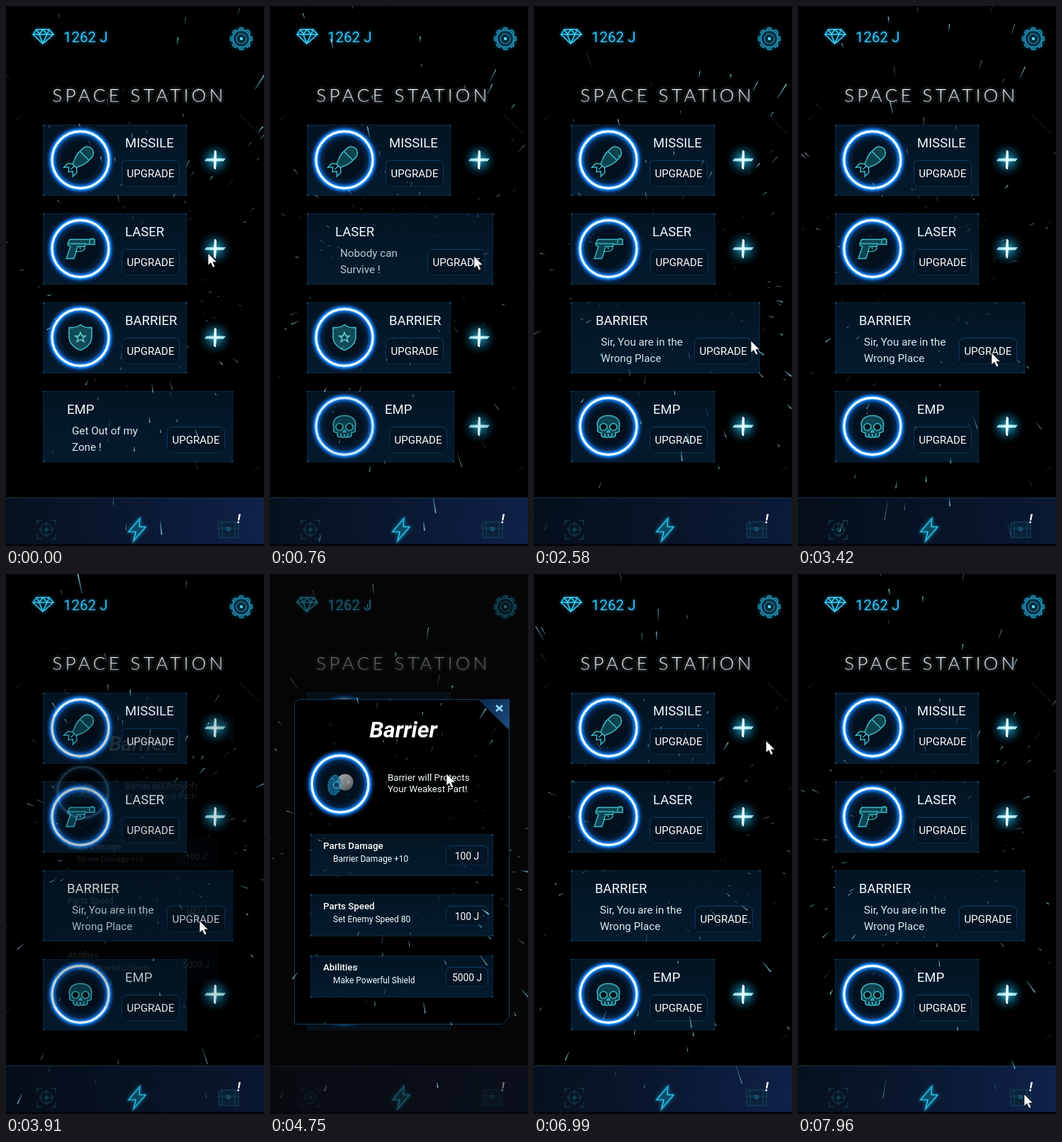
These frames come from a looping animation (364 by 760 pixels, 8 s). An HTML page with a canvas:

```html
<!DOCTYPE html>
<html lang="en">
<head>
<meta charset="utf-8">
<title>Space Station</title>
<style>
html, body { margin: 0; width: 100%; height: 100%; overflow: hidden; background: #000; }
canvas { display: block; width: 100vw; height: 100vh; }
</style>
</head>
<body>
<canvas id="stage" width="364" height="760"></canvas>
<script>
const ctx = document.getElementById('stage').getContext('2d');
const LOOP = 8000, STEP = 70, TAU = Math.PI * 2;
const clamp = v => Math.max(0, Math.min(1, v));
const smooth = v => { v = clamp(v); return v * v * (3 - 2 * v); };
const mix = (a, b, k) => a + (b - a) * k;
const random = n => { const v = Math.sin(n * 12.9898 + 4.1) * 43758.5453; return v - Math.floor(v); };

const CARDS = [
  { title: 'MISSILE', icon: missile },
  { title: 'LASER', icon: pistol, note: ['Nobody can', 'Survive !'], open: 400, close: 2050 },
  { title: 'BARRIER', icon: shield, note: ['Sir, You are in the', 'Wrong Place'], open: 2050, close: Infinity },
  { title: 'EMP', icon: skull, note: ['Get Out of my', 'Zone !'], open: -5000, close: 400 }
];
const OFFERS = [
  [366, 'Parts Damage', 'Barrier Damage +10', '100 J'],
  [451, 'Parts Speed', 'Set Enemy Speed 80', '100 J'],
  [537, 'Abilities', 'Make Powerful Shield', '5000 J']
];
const POPUP_OPEN = 3800, POPUP_CLOSE = 6500;
// time, x, y of the pointer tip
const POINTER = [
  [0, 285, 348], [600, 287, 346], [1350, 303, 472], [2580, 306, 471], [3250, 273, 488],
  [3950, 273, 488], [4650, 249, 281], [5400, 250, 282], [6000, 332, 184], [6750, 328, 188],
  [7750, 319, 732], [8000, 319, 732]
];

// ---- helpers ----
function group(draw, x = 0, y = 0, alpha = 1) {
  ctx.save();
  ctx.translate(x, y);
  ctx.globalAlpha *= alpha;
  draw();
  ctx.restore();
}
function text(str, x, y, font, color = '#f2fbff', align = 'left') {
  ctx.font = font + ' Roboto, sans-serif';
  ctx.textAlign = align;
  ctx.fillStyle = color;
  ctx.fillText(str, x, y);
}
function shape(d, stroke, fill, width = 1) {
  const path = new Path2D(d);
  if (fill) { ctx.fillStyle = fill; ctx.fill(path); }
  if (stroke) { ctx.strokeStyle = stroke; ctx.lineWidth = width; ctx.stroke(path); }
}
function circle(x, y, r, stroke, fill, width = 1) {
  ctx.beginPath();
  ctx.arc(x, y, r, 0, TAU);
  if (fill) { ctx.fillStyle = fill; ctx.fill(); }
  if (stroke) { ctx.strokeStyle = stroke; ctx.lineWidth = width; ctx.stroke(); }
}
function gradient(x0, y0, x1, y1, ...colors) {
  const g = ctx.createLinearGradient(x0, y0, x1, y1);
  colors.forEach((c, i) => g.addColorStop(i / (colors.length - 1), c));
  return g;
}
// radial glow around the current origin; stops are [radius, color]
function halo(...stops) {
  const r = stops[stops.length - 1][0];
  const g = ctx.createRadialGradient(0, 0, 0, 0, 0, r);
  stops.forEach(([at, color]) => g.addColorStop(at / r, color));
  circle(0, 0, r, null, g);
}
function glow(color, blur) { ctx.shadowColor = color; ctx.shadowBlur = blur; }

function panel(x, y, w, h) {
  ctx.fillStyle = gradient(x, y, x, y + h, '#031422', '#03182a', '#041a2d');
  ctx.fillRect(x, y, w, h);
  ctx.strokeStyle = '#08263d';
  ctx.lineWidth = 1;
  ctx.strokeRect(x + .5, y + .5, w - 1, h - 1);
  ctx.fillStyle = '#175275';
  for (const cx of [x, x + w - 2]) for (const cy of [y, y + h - 2]) ctx.fillRect(cx, cy, 2, 2);
}
function button(x, y, w, h, label, font) {
  ctx.beginPath();
  ctx.roundRect(x + .5, y + .5, w - 1, h - 1, 7);
  ctx.fillStyle = '#031424';
  ctx.fill();
  ctx.strokeStyle = gradient(x, y, x, y + h, '#0c3f6b', '#0a2c4c');
  ctx.lineWidth = 1;
  ctx.stroke();
  text(label, x + w / 2, y + h / 2 + 5.5, font, '#fff', 'center');
}
function ring(x, y) {
  group(() => {
    halo([0, '#02101c'], [26, '#02111f'], [33, '#04254a'], [37, '#0a5bc0'], [40, '#1590ff'],
      [43, '#0d72e0'], [45, 'rgba(6,62,135,.75)'], [50, 'rgba(2,30,70,0)']);
    glow('#1a9aff', 5);
    circle(0, 0, 40, '#e6f7ff', null, 3.4);
  }, x, y);
}
function plus(x, y) {
  group(() => {
    halo([0, 'rgba(50,190,220,.85)'], [9, 'rgba(22,125,158,.65)'], [17, 'rgba(8,68,94,.4)'], [25, 'rgba(0,35,55,0)']);
    shape('M-15 1L-12-2H-2L-1-14L2-12V-2H15L12 2H2L1 14L-2 12V2H-13Z', null,
      gradient(-14, 0, 14, 0, '#7fd7e8', '#eaffff', '#8be0f0'));
  }, x, y);
}

// ---- card icons, centred on their ring ----
const LINE = '#3cb9c6', TINT = '#0c4450';
function missile() {
  ctx.rotate(Math.PI / 4);
  shape('M-9-12C-9-26 9-26 9-12V-5C9 3 4 7 4 12H-4C-4 7-9 3-9-5Z', LINE, TINT, 1.5);
  shape('M-9-8H9M-4 12L-9 16V24L-4 19L0 24L4 19L9 24V16L4 12M0 12V19', LINE, null, 1.5);
}
function pistol() {
  shape('M-15-13H15V-14H18V-13H20V-6H8L5-3H-4L-9 14H-20L-14-3Q-18-4-18-7Z', LINE, TINT, 1.5);
  shape('M-17-7H8M6-4Q8 5-6 4M-1-3L0 1M13-12V-7', LINE, null, 1.4);
}
function shield() {
  shape('M0-18Q6-13 16-14V0Q15 12 0 18Q-15 12-16 0V-14Q-6-13 0-18Z', LINE, '#114b56', 1.6);
  shape('M0-7L2-2L7-2L3 1L5 6L0 3L-5 6L-3 1L-7-2L-2-2Z', '#6bdbe5', '#0b3a46', 1.4);
}
function skull() {
  shape('M-10 9Q-17 9-15 3C-18-9-11-15 0-15S18-9 15 3Q17 9 10 9V13Q8 17 5 14Q2 18 0 14Q-2 18-5 14Q-8 17-10 13Z', LINE, TINT, 1.6);
  circle(-7, 1, 5, LINE, '#03141d', 1.6);
  circle(7, 1, 5, LINE, '#03141d', 1.6);
  shape('M0 5L-2 8H2ZM-5 10V14M0 11V14M5 10V14', LINE, null, 1.3);
}

// ---- screen parts ----
function header() {
  group(() => {
    glow('#0a7fae', 4);
    shape('M38 40L43 33H61L67 40L52 53ZM38 40H67M43 33L47 40L52 53L58 40L61 33M47 40L52 33L58 40', '#3bcdf2', null, 1.6);
    text('1262 J', 81, 51, '20.5px', '#35bfee');
  });
  group(() => {
    glow('#0a7fae', 5);
    circle(0, 0, 12, '#2aa6cf', '#02131d', 1.6);
    circle(0, 0, 7, '#2390b5', null, 1.2);
    circle(0, 0, 2.2, null, '#5fd6f5');
    for (let i = 0; i < 8; i++) {
      ctx.rotate(TAU / 8);
      shape('M-3-13L-2-15H2L3-13', '#2aa6cf', null, 1.4);
    }
  }, 332, 46);
  group(() => {
    glow('#8fa9b5', 5);
    ctx.letterSpacing = '4.4px';
    ctx.font = '300 26px Lato, sans-serif';
    ctx.textAlign = 'center';
    ctx.fillStyle = gradient(0, 116, 0, 136, '#ffffff', '#dfe7eb', '#a4b0b6');
    ctx.fillText('SPACE STATION', 188, 135);
  });
  shape('M330 153L357 180M14 161L24 152M348 657L358 648', '#1b1f22');
}
function openness(card, t) {
  if (card.open === undefined || t < card.open) return 0;
  const tail = since => Math.exp(-(t - since) / 115);
  return t < card.close ? 1 - tail(card.open) : tail(card.close);
}
function drawCard(card, i, t) {
  const y = 167 + 125 * i, k = openness(card, t);
  const closed = clamp(1 - 2 * k), opened = clamp(2 * k - 1);
  panel(52, y, Math.round(mix(203, 268, k)), 100);
  if (closed) group(() => {
    ring(105, y + 49.5);
    group(card.icon, 105, y + 49.5);
    plus(295, y + 49.5);
  }, 0, 0, closed);
  text(card.title, Math.round(mix(168, 86, k)), y + 31.5, '18.5px');
  if (opened) group(() => card.note.forEach((line, n) =>
    text(line, mix(175, 93, k), y + 61 + 22.5 * n, '15.2px', '#dce9ef')), 0, 0, opened);
  button(Math.round(mix(163, 227, k)), y + 50, 82, 37, 'UPGRADE', '15px');
}
function navigation(t) {
  const light = .5 + .5 * Math.cos(t / 7600 * TAU);
  ctx.fillStyle = gradient(0, 692, 364, 720, '#050e1a', '#071326', '#0a1833');
  ctx.fillRect(0, 692, 364, 66);
  group(() => {
    ctx.fillStyle = gradient(0, 692, 364, 720, '#06111f', '#0a1832', '#10224a');
    ctx.fillRect(0, 692, 364, 66);
  }, 0, 0, light);
  ctx.fillStyle = '#123a55';
  ctx.fillRect(0, 692, 364, 1);
  ctx.fillStyle = '#05030d';
  ctx.fillRect(0, 757, 364, 3);

  group(() => {
    const dim = '#103847';
    shape('M-13-7V-13H-7M7-13H13V-7M13 7V13H7M-7 13H-13V7M0-11V-5M0 5V11M-11 0H-5M5 0H11', dim, null, 1.5);
    circle(0, 0, 8, dim, null, 1.5);
    circle(0, 0, 3, dim, dim);
  }, 57, 737);
  group(() => {
    glow('#0a80a8', 5);
    shape('M4-16L-12 3H-2L-5 16L12-4H3Z', '#2bb8dc', '#0b4257', 1.7);
  }, 185, 737);
  group(() => {
    shape('M-14 11V-7Q-13-11-9-11H9Q13-11 14-7V11ZM-14-2H14M-9-11V11M9-11V11', '#123e55', '#0a2138', 1.4);
    ctx.fillStyle = '#174d64';
    ctx.fillRect(-3, -4, 6, 6);
  }, 314, 737);
  text('!', 326, 728, 'italic bold 18px', '#fff');
}
function popup(p) {
  ctx.fillStyle = `rgba(10,10,10,${.58 * p})`;
  ctx.fillRect(0, 0, 364, 760);
  ctx.save();
  ctx.globalAlpha = p;
  const s = mix(.88, 1, p);
  ctx.translate(186, 404);
  ctx.scale(s, s);
  ctx.translate(-186, -404);

  shape('M40.5 176.5H337.5V624L328 633.5H34.5V182Z', '#123b60', '#000');
  shape('M293 176H338V220Z', null, gradient(300, 180, 338, 215, '#0c2c52', '#1c4c7c'));
  shape('M319 185L328 193M328 185L319 193', '#93dcf8', null, 2.6);
  text('Barrier', 188, 230, 'italic bold 32px', '#fff', 'center');

  ring(99, 295.5);
  circle(106, 293, 11.5, null, gradient(98, 283, 114, 304, '#a2a7aa', '#55595d'));
  circle(110, 292, 4, '#73787b', '#8b9093');
  ctx.beginPath();
  ctx.ellipse(91, 297, 9, 14, .15, 0, TAU);
  ctx.fillStyle = 'rgba(20,110,160,.75)';
  ctx.fill();
  ctx.strokeStyle = '#3fb5df';
  ctx.setLineDash([2, 1.5]);
  ctx.stroke();
  ctx.setLineDash([]);
  circle(94, 297, 4.5, '#65d0ee', '#124560');

  text('Barrier will Protects', 166, 291, '13.3px');
  text('Your Weakest Part!', 166, 307, '13.3px');
  for (const [y, title, detail, price] of OFFERS) {
    panel(57, y, 258, 59);
    text(title, 75, y + 20.5, '500 13.3px', '#fff');
    text(detail, 89, y + 39, '12px');
    button(248, y + 16, 60, 28, price, '13.8px');
  }
  ctx.restore();
}
function stars(t) {
  ctx.lineCap = 'round';
  for (let i = 0; i < 190; i++) {
    const r = n => random(i * 5 + n);
    const u = (t / (1600 + 1400 * r(1)) + r(2)) % 1;
    const d = 55 * Math.exp(u * 2.2), len = d * (.015 + .06 * r(3) * r(3));
    const angle = r(0) * TAU, dx = Math.cos(angle), dy = Math.sin(angle);
    const x = 182 + dx * d, y = 380 + dy * d;
    const alpha = Math.min(1, u * 2) * (.35 + .6 * r(4));
    ctx.strokeStyle = gradient(x - dx * len, y - dy * len, x, y,
      `rgba(70,150,175,${alpha * .5})`, `rgba(165,230,246,${alpha})`);
    ctx.lineWidth = .8 + 1.1 * r(4) * u;
    ctx.beginPath();
    ctx.moveTo(x - dx * len, y - dy * len);
    ctx.lineTo(x, y);
    ctx.stroke();
  }
  ctx.lineCap = 'butt';
}
function pointer(t) {
  const n = POINTER.findIndex(key => key[0] > t);
  const [t0, x0, y0] = POINTER[n - 1], [t1, x1, y1] = POINTER[n];
  const k = smooth((t - t0) / (t1 - t0));
  group(() => shape('M0 0V17L4 13.5L7 20L10 18.5L7 12.5H12.5Z', '#111', '#fff', .8), mix(x0, x1, k), mix(y0, y1, k));
}

function render(t) {
  ctx.fillStyle = '#000';
  ctx.fillRect(0, 0, 364, 760);
  header();
  CARDS.forEach((card, i) => drawCard(card, i, t));
  navigation(t);
  const shown = smooth((t - POPUP_OPEN) / 250) * (1 - smooth((t - POPUP_CLOSE) / 250));
  if (shown) popup(shown);
  stars(t);
  pointer(t);
}
const start = performance.now();
function tick() {
  const t = (performance.now() - start) % LOOP;
  render(Math.floor(t / STEP) * STEP);
  requestAnimationFrame(tick);
}
tick();
</script>
</body>
</html>
```
